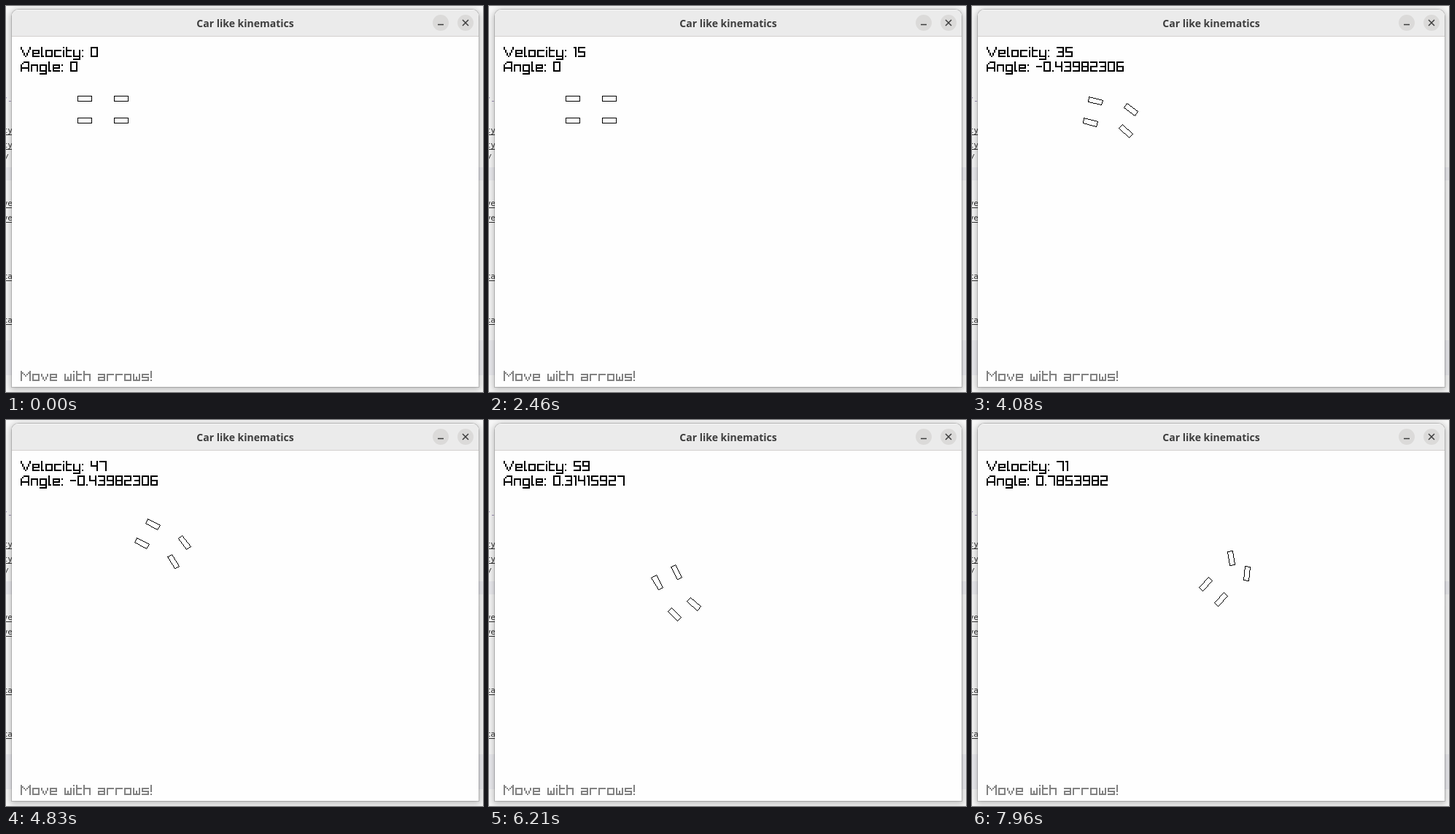
An HTML page with a canvas that plays this animation: 654x529 px, repeating every 8 s.

```html
<!DOCTYPE html>
<html lang="en">
<head>
<meta charset="utf-8">
<title>Car like kinematics</title>
<style>
html, body { margin: 0; width: 654px; height: 529px; overflow: hidden; }
body { position: relative; background: #f7f7f7; }
.page, .page * { position: absolute; }
.page { inset: 0; overflow: hidden; }
.page i { left: 0; width: 654px; background: #ececf0; }
.page span {
  right: 645px; height: 14px; color: #333; white-space: pre;
  font: 11px/14px "DejaVu Sans Mono", monospace;
}
.page u { text-underline-offset: 2px; }
.window {
  position: absolute; left: 8px; top: 5px; width: 640px; height: 517px;
  background: #fefefe; border-radius: 9px 9px 0 0; overflow: hidden;
}
.shadow {
  position: absolute; left: 8px; top: 5px; width: 640px; height: 517px;
  border-radius: 9px 9px 0 0;
  box-shadow: 0 0 0 1px rgba(0,0,0,.17), 0 2px 9px 2px rgba(0,0,0,.24);
}
.bar {
  height: 36px; background: #ebebeb; border-bottom: 1px solid #d3d0ce;
  box-shadow: inset 0 1px #f6f6f6;
  text-align: center; color: #3d3d3d;
  font: 700 14px/37px "Open Sans", "Noto Sans", sans-serif;
}
.bar svg { position: absolute; left: 0; top: 0; }
canvas { position: absolute; left: 0; top: 37px; }
</style>
</head>
<body>
<div class="page">
  <i style="top:221px;height:18px"></i>
  <i style="top:458px;height:48px"></i>
  <span style="top:123px;color:#8a7aa8"><em style="position:static">(-</em></span>
  <span style="top:164px"><u style="position:static">ty</u></span>
  <span style="top:184px"><u style="position:static">ty</u></span>
  <span style="top:201px;right:650px">/</span>
  <span style="top:264px"><u style="position:static">ve</u></span>
  <span style="top:284px"><u style="position:static">ve</u></span>
  <span style="top:364px"><u style="position:static">ca</u></span>
  <span style="top:424px"><u style="position:static">ca</u></span>
</div>
<div class="shadow"></div>
<div class="window">
  <div class="bar">Car like kinematics
    <svg width="640" height="36" fill="none" stroke="#3d3d3d" stroke-width="1.5">
      <g fill="#dbdad9" stroke="none"><circle cx="588" cy="18" r="11"/><circle cx="622" cy="18" r="11"/></g>
      <path d="M584 20.5h8M618 14l8 8m0-8l-8 8"/>
    </svg>
  </div>
  <canvas id="view" width="640" height="480" role="img"></canvas>
</div>
<script>
const LOOP = 8000, TICK = 60, FPS = 24;
const BASE = 50, TRACK = 30, TURN = Math.fround(Math.PI / 100), MAX = Math.fround(Math.PI / 4);
const view = document.getElementById('view');
const ctx = view.getContext('2d');

// Stroke font: width, then polylines of xy grid points
const GLYPHS = {
  '0': [5, '00 40 46 06 00'], '1': [2, '00 10 16'], '2': [5, '00 40 43 03 06 46'],
  '3': [5, '00 40 46 06|13 43'], '4': [5, '00 03 43|40 46'], '5': [5, '40 00 03 43 46 06'],
  '6': [5, '40 00 06 46 43 03'], '7': [5, '00 40 46'], '8': [5, '00 40 46 06 00|03 43'],
  '9': [5, '43 03 00 40 46 06'], '-': [4, '03 33'], '.': [1, '06 06'], ':': [1, '02 02|06 06'],
  '!': [1, '00 04|06 06'], ' ': [3, ''],
  A: [6, '06 02 20 50 56|04 54'], M: [7, '06 00 33 60 66'], V: [7, '00 01|12 13|24 25|36 36|45 44|53 52|61 60'],
  a: [5, '02 42 46 06 04 44'], c: [5, '42 02 06 46'], e: [5, '46 06 02 42 44 04'],
  g: [5, '46 06 02 42 48 08'], h: [5, '00 06|02 42 46'], i: [1, '00 00|02 06'], l: [2, '00 06 16'],
  n: [5, '06 02 42 46'], o: [5, '02 42 46 06 02'], r: [5, '06 02 42'], s: [5, '42 02 04 44 46 06'],
  t: [4, '00 06 36|02 32'], v: [5, '02 03|14 15|26 26|35 34|43 42'], w: [5, '02 06 46 42|24 26'],
  y: [5, '02 06 46|42 48 08']
};

// Unsmoothed line of square dots
function line(x0, y0, x1, y1, dot = 1, ox = 0, oy = 0) {
  const n = Math.max(Math.abs(x1 - x0), Math.abs(y1 - y0)) || 1;
  for (let i = 0; i <= n; i++) {
    const x = Math.round(x0 + (x1 - x0) * i / n), y = Math.round(y0 + (y1 - y0) * i / n);
    ctx.fillRect(ox + x * dot, oy + y * dot, dot, dot);
  }
}

function write(text, x, y, color) {
  ctx.fillStyle = color;
  for (const ch of text) {
    const [width, strokes] = GLYPHS[ch];
    for (const stroke of strokes.split('|')) {
      const p = stroke.split(' ');
      for (let i = 1; i < p.length; i++) line(+p[i - 1][0], +p[i - 1][1], +p[i][0], +p[i][1], 2, x, y);
    }
    x += (width + 1) * 2;
  }
}

function wheel(x, y, dir) {
  const c = Math.cos(dir), s = Math.sin(dir);
  const pts = [[-9.5, -3.5], [9.5, -3.5], [9.5, 3.5], [-9.5, 3.5]].map(([a, b]) =>
    [Math.round(x - .5 + a * c - b * s), Math.round(y - .5 + a * s + b * c)]);
  pts.forEach((p, i) => line(...p, ...pts[(i + 1) % 4]));
}

// Held keys: start in ms, number of ticks, sign
const GAS = [[1630, 8, 1], [2280, 7, 1], [2600, 20, 1], [4400, 12, 1], [4870, 12, 1], [7740, 12, 1]];
const STEER = [[3258, 14, -1], [5805, 36, 1], [7045, 4, 1]];
function pressed(keys, tick) {
  const key = keys.find(([at, n]) => {
    const start = Math.round(at * TICK / 1000);
    return tick >= start && tick < start + n;
  });
  return key ? key[2] : 0;
}

function drive() {
  let s = { x: 100, y: 100, dir: 0, v: 0, angle: 0 };
  const states = [s];
  for (let k = 0; k < LOOP * TICK / 1000; k++) {
    const v = s.v + pressed(GAS, k);
    const turned = Math.fround(s.angle + pressed(STEER, k) * TURN);
    const angle = Math.max(-MAX, Math.min(MAX, turned));
    const step = v / TICK;
    s = {
      x: s.x + step * Math.cos(s.dir), y: s.y + step * Math.sin(s.dir),
      dir: s.dir - step / BASE * Math.tan(angle), v, angle
    };
    states.push(s);
  }
  return states;
}
const states = drive();

// Shortest decimal that still gives the same 32-bit float
function float(n) {
  for (let d = 0; d < 20; d++) if (Math.fround(n.toFixed(d)) === n) return n.toFixed(d);
  return n.toFixed(8);
}

function draw({ x, y, dir, v, angle }) {
  const c = Math.cos(dir), s = Math.sin(dir), bend = Math.tan(angle);
  const speed = 'Velocity: ' + v, steer = 'Angle: ' + float(angle), hint = 'Move with arrows!';
  ctx.clearRect(0, 0, 640, 480);
  write(speed, 12, 14, '#000');
  write(steer, 12, 34, '#000');
  write(hint, 12, 458, '#828282');
  ctx.fillStyle = '#000';
  for (const side of [-TRACK / 2, TRACK / 2]) {
    const wx = x - side * s, wy = y + side * c;
    wheel(wx, wy, dir);
    wheel(wx + BASE * c, wy + BASE * s, dir - Math.atan(BASE * bend / (BASE + side * bend)));
  }
  view.setAttribute('aria-label', `${speed}, ${steer}. ${hint}`);
}

let shown = -1;
function frame(now) {
  const n = Math.floor((now % LOOP + 5) * FPS / 1000) % (LOOP * FPS / 1000);
  if (n !== shown) draw(states[Math.floor(n * TICK / FPS)]);
  shown = n;
  requestAnimationFrame(frame);
}
frame(0);
</script>
</body>
</html>
```
